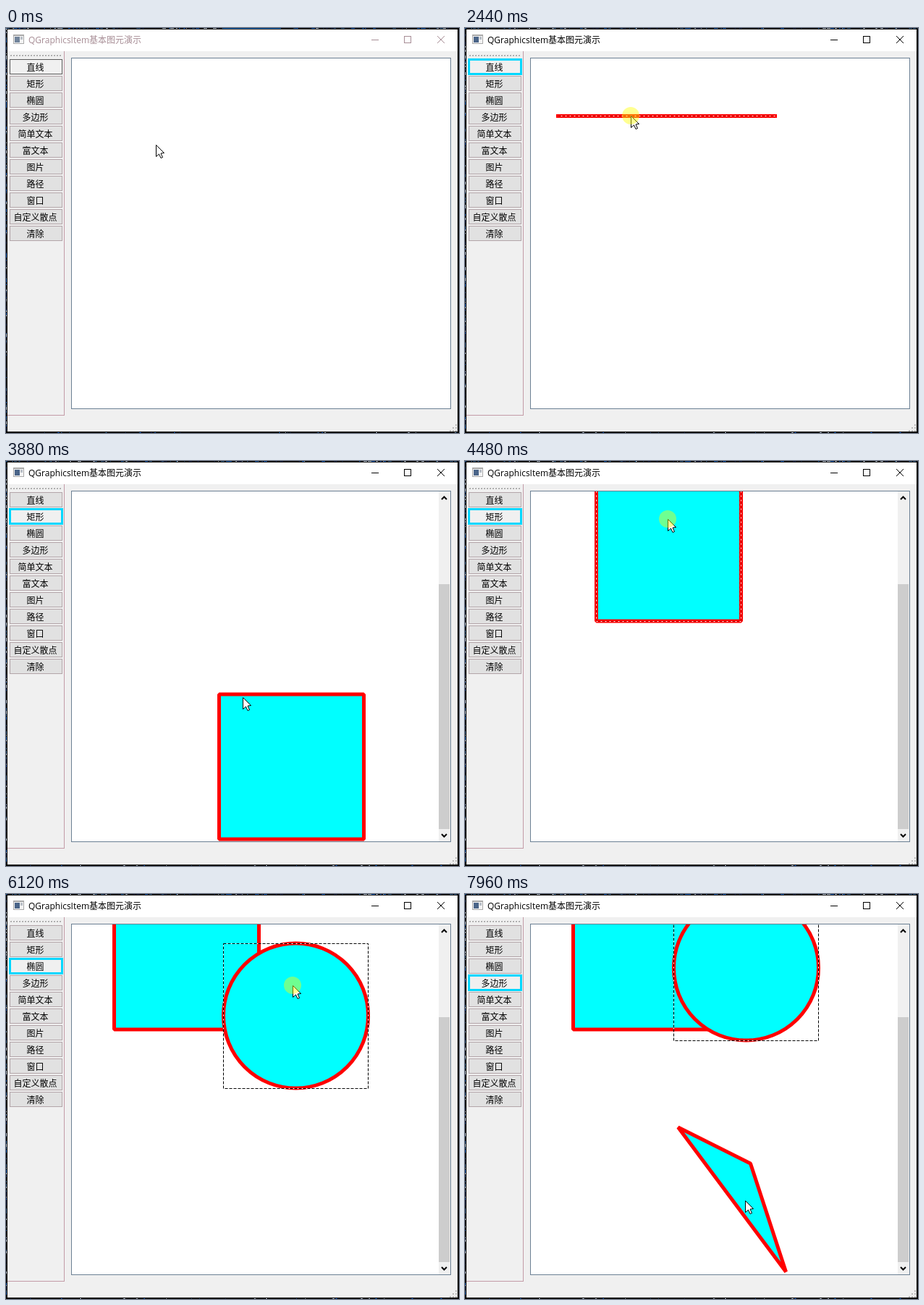
Recreate the animation shown at these times as an HTML page with a canvas. Size 626 by 559 pixels, loop 8000 ms.

```html
<!DOCTYPE html>
<html lang="zh-CN">
<head>
<meta charset="utf-8">
<style>
html, body { margin: 0; width: 100%; height: 100%; overflow: hidden; background: #000; }
canvas { display: block; }
</style>
</head>
<body>
<canvas id="stage" width="626" height="559"></canvas>
<script>
const ctx = document.getElementById('stage').getContext('2d');
const LOOP = 8000;
const FONT = '"Open Sans", "Noto Sans CJK SC", "Noto Sans CJK", sans-serif';
const LABELS = ['直线', '矩形', '椭圆', '多边形', '简单文本', '富文本', '图片', '路径', '窗口', '自定义散点', '清除'];
const ORIGIN = [294.5, 322];

// The screen refreshes every 200 ms, with a few slower ticks of 220 ms.
const SLOW = [4, 10, 16, 18, 22, 26, 30, 38];
const TICKS = [0];
for (let i = 0; i < 39; i++) TICKS.push(TICKS[i] + (SLOW.includes(i) ? 220 : 200));

// Pointer path: [tick, x, y]
const PATH = [
  [0, 207, 161], [3, 45, 58], [5, 48, 60], [6, 67, 72], [8, 303, 283], [9, 303, 283],
  [12, 229, 121], [14, 203, 67], [15, 203, 67], [18, 40, 78], [19, 327, 326], [20, 393, 381],
  [22, 280, 80], [23, 248, 46], [24, 200, 56], [26, 34, 94], [27, 36, 96], [28, 390, 380],
  [30, 396, 126], [32, 384, 60], [33, 384, 60], [36, 40, 122], [37, 40, 122], [38, 330, 380], [39, 387, 423]
];
// Ticks during which each shape is dragged
const DRAG = { line: [9, 14], rect: [20, 23], ellipse: [28, 32] };
const CREATED = [4, 19, 27, 38];

function pointer(n) {
  const i = Math.max(1, PATH.findIndex(p => p[0] >= n));
  const [n0, x0, y0] = PATH[i - 1], [n1, x1, y1] = PATH[i];
  const k = (n - n0) / (n1 - n0);
  return [Math.round(x0 + (x1 - x0) * k), Math.round(y0 + (y1 - y0) * k)];
}

function dragged([x, y], [start, end], n) {
  const a = pointer(start), b = pointer(Math.min(end, Math.max(start, n)));
  return [x + b[0] - a[0], y + b[1] - a[1]];
}

function box(x, y, w, h, color) {
  ctx.fillStyle = color;
  ctx.fillRect(x, y, w, h);
}

function frame(x, y, w, h, color, width = 1) {
  ctx.strokeStyle = color;
  ctx.lineWidth = width;
  ctx.strokeRect(x + width / 2, y + width / 2, w - width, h - width);
}

function polyline(points, color, width) {
  ctx.beginPath();
  points.forEach(p => ctx.lineTo(...p));
  ctx.strokeStyle = color;
  ctx.lineWidth = width;
  ctx.stroke();
}

function desktopEdge(active) {
  let seed = active ? 11 : 29;
  const random = () => (seed = seed * 16807 % 2147483647) / 2147483647;
  const colors = ['#0a63b8', '#1b2a4a', '#b9c3d0', '#3a5f86'];
  const pick = () => colors[Math.floor(random() * colors.length)];
  box(0, 0, 626, 559, '#000');
  for (let i = 0; i < 90; i++) box(random() * 626 | 0, 0, 1 + random() * 5 | 0, 1, pick());
  for (let i = 0; i < 150; i++) box(0, random() * 559 | 0, 1, 1 + random() * 4 | 0, pick());
  for (let i = 0; i < 25; i++) box(random() * 626 | 0, 558, 1 + random() * 3 | 0, 1, pick());
  if (!active) box(300, 0, 80, 1, '#0878d0');
}

function windowFrame(active) {
  const ink = active ? '#000' : '#a78d95';
  box(2, 2, 622, 555, '#f0f0f0');
  box(2, 2, 622, 30, '#fff');
  box(10, 9, 15, 13, '#a9a9a9');
  box(11, 11, 13, 10, '#f4f4f4');
  box(12, 12, 7, 8, active ? '#4a6488' : '#71849b');
  box(20, 12, 3, 4, '#b8bec6');
  ctx.font = '12px ' + FONT;
  ctx.textBaseline = 'alphabetic';
  ctx.textAlign = 'left';
  ctx.fillStyle = ink;
  ctx.fillText('QGraphicsItem基本图元演示', 31, 21);
  box(505, 16, 10, 1, ink);
  frame(550, 11, 10, 10, ink);
  polyline([[596, 11], [606, 21]], ink, 1);
  polyline([[606, 11], [596, 21]], ink, 1);

  for (let x = 6; x < 77; x += 4) {
    box(x, 37, 2, 2, '#b0b0b0');
    box(x, 36, 1, 1, '#fff');
  }
  box(80, 32, 1, 503, '#c39ba7');
  box(2, 534, 79, 1, '#c39ba7');
  for (let row = 0; row < 3; row++)
    for (let col = 2 - row; col < 3; col++) box(613 + col * 4, 547 + row * 4, 2, 2, '#b8b8b8');
}

function buttons(focus, hover) {
  ctx.textAlign = 'center';
  LABELS.forEach((label, i) => {
    const y = 43 + 23 * i, lit = i === focus || i === hover;
    box(5, y, 73, 21, lit ? '#f0f0f0' : '#e1e1e1');
    if (i === focus) frame(4, y - 1, 75, 23, '#00d7ff', 3);
    else frame(5, y, 73, 21, lit ? '#5c5c5c' : '#b3a5a9');
    ctx.fillStyle = '#000';
    ctx.fillText(label, 40.5, y + 16);
  });
}

function outline() {
  ctx.fillStyle = '#0ff';
  ctx.strokeStyle = '#f00';
  ctx.lineWidth = 5;
  ctx.fill();
  ctx.stroke();
}

function selection(x, y, w, h, dash) {
  ctx.beginPath();
  if (h) ctx.rect(x, y, w, h);
  else { ctx.moveTo(x, y); ctx.lineTo(x + w, y); }
  ctx.lineWidth = 1;
  ctx.strokeStyle = '#fff';
  ctx.stroke();
  ctx.setLineDash([4, 2]);
  ctx.strokeStyle = dash;
  ctx.stroke();
  ctx.setLineDash([]);
}

function shapes(n) {
  ctx.lineJoin = 'bevel';
  if (n >= CREATED[0] && n < CREATED[1]) {
    const [x, y] = dragged([202.5, 283.5], DRAG.line, n);
    box(x - 2.5, y - 2.5, 305, 5, '#f00');
    if (n >= DRAG.line[0]) selection(x, y, 300, 0, '#c80000');
  }
  if (n >= CREATED[1]) {
    const [x, y] = dragged(ORIGIN, DRAG.rect, n);
    ctx.beginPath();
    ctx.rect(x, y, 200, 200);
    outline();
    if (n >= DRAG.rect[0] && n < DRAG.ellipse[0]) selection(x, y + .5, 200, 200, '#c00000');
  }
  if (n >= CREATED[2]) {
    const [x, y] = dragged(ORIGIN, DRAG.ellipse, n);
    ctx.beginPath();
    ctx.arc(x + 100, y + 100, 100, 0, 2 * Math.PI);
    outline();
    if (n >= DRAG.ellipse[0]) selection(x, y + .5, 200, 200, '#000');
  }
  if (n >= CREATED[3]) {
    const [x, y] = ORIGIN;
    ctx.beginPath();
    ctx.moveTo(x, y);
    ctx.lineTo(x + 100, y + 50);
    ctx.lineTo(x + 149, y + 199.5);
    ctx.closePath();
    outline();
  }
  ctx.lineJoin = 'miter';
}

function scrollbar() {
  box(598, 42, 16, 483, '#f0f0f0');
  box(598, 170, 15, 338, '#cdcdcd');
  polyline([[602, 53], [605.5, 49.5], [609, 53]], '#000', 2);
  polyline([[602, 515], [605.5, 518.5], [609, 515]], '#000', 2);
}

function view(n) {
  box(90, 41, 525, 485, '#fff');
  ctx.save();
  ctx.beginPath();
  ctx.rect(91, 42, 523, 483);
  ctx.clip();
  shapes(n);
  if (n >= CREATED[1]) scrollbar();
  ctx.restore();
  frame(90, 41, 525, 485, '#6b8094');
}

function cursor(n) {
  const [x, y] = pointer(n);
  ctx.save();
  ctx.translate(x + .5, y + .5);
  ctx.beginPath();
  [[0, 0], [0, 16], [4, 12.5], [6.5, 18], [9, 17], [6.5, 11.5], [11, 11]].forEach(p => ctx.lineTo(...p));
  ctx.closePath();
  ctx.fillStyle = '#fff';
  ctx.fill();
  ctx.strokeStyle = '#000';
  ctx.lineWidth = 1;
  ctx.stroke();
  const pressed = n === CREATED[0] || n === CREATED[2] ||
    Object.values(DRAG).some(([start, end]) => n >= start && n <= end);
  if (pressed) {
    ctx.beginPath();
    ctx.arc(-.5, -.5, 12, 0, 2 * Math.PI);
    ctx.fillStyle = 'rgba(255,255,0,.43)';
    ctx.fill();
  }
  ctx.restore();
}

function hovered(n) {
  if (n < CREATED[0]) return 0;
  if (n === 18) return 1;
  if (n === 26) return 2;
  return n === 36 || n === 37 ? 3 : -1;
}

function draw(now) {
  const t = now % LOOP;
  const n = TICKS.filter(tick => tick <= t).length - 1;
  const active = n >= CREATED[0];
  desktopEdge(active);
  windowFrame(active);
  buttons(CREATED.filter(tick => tick <= n).length - 1, hovered(n));
  view(n);
  cursor(n);
}

const start = performance.now();
function loop() {
  draw(performance.now() - start);
  requestAnimationFrame(loop);
}
loop();
</script>
</body>
</html>
```
